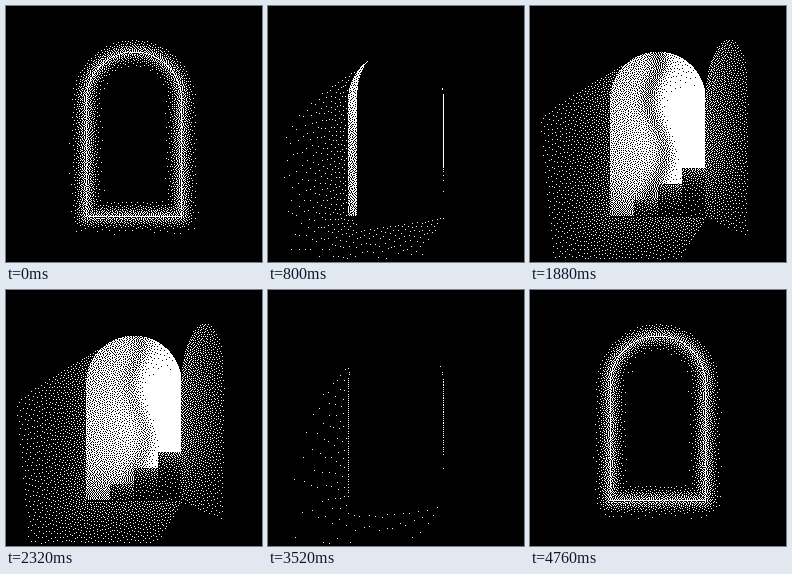
Write an HTML page with a canvas that moves like this. It is 256 by 256 pixels and loops after 4800 ms.

```html
<!DOCTYPE html>
<html lang="en">
<head>
<meta charset="utf-8">
<title>Door of light</title>
<style>
html, body { margin: 0; width: 100%; height: 100%; overflow: hidden; background: #000; }
canvas { display: block; width: 100%; height: 100%; image-rendering: pixelated; }
</style>
</head>
<body>
<canvas id="stage" width="256" height="256"></canvas>
<script>
const SIZE = 256, LOOP = 4800, STEP = 40;
const DEPTH = 411, EYE_X = 128, EYE_Y = 138, HINGE = 174.8, WIDE = 95;
const ctx = document.getElementById('stage').getContext('2d');
const image = ctx.createImageData(SIZE, SIZE);
const dots = new Uint32Array(image.data.buffer);
const light = new Float32Array(SIZE * SIZE);

// Fixed grain that keeps the stipple from forming rows
let seed = 7;
const grain = Float32Array.from({ length: SIZE * SIZE }, () => {
  seed = (Math.imul(seed, 1664525) + 1013904223) >>> 0;
  return 0.5 + 0.24 * (seed / 4294967296 - 0.5);
});

const clamp = v => Math.max(0, Math.min(1, v));
const smooth = v => { v = clamp(v); return v * v * (3 - 2 * v); };

// Linear track through [time, value] points
function track(points, t) {
  if (t <= points[0][0]) return points[0][1];
  for (let i = 1; i < points.length; i++) {
    const [a, va] = points[i - 1], [b, vb] = points[i];
    if (t < b) return va + (vb - va) * (t - a) / (b - a);
  }
  return points[points.length - 1][1];
}

// Signed distance to the arched doorway
function arch(x, y) {
  const dx = Math.abs(x - 127.5);
  if (y < 93) return Math.hypot(dx, y - 93) - 47.5;
  const sx = dx - 47.5, sy = y - 210;
  return sx > 0 && sy > 0 ? Math.hypot(sx, sy) : Math.max(sx, sy);
}

function doorAngle(t) {
  const opening = 1 - (1 - clamp((t - 650) / 920)) ** 2;
  const closing = clamp((t - 2850) / 730) ** 2;
  return 104 * (opening - closing);
}

function room(x, y, veil) {
  const stair = 210 - 16 * Math.floor((x - 80) / 24);
  if (y >= stair) {
    if (y === 210) return 0;
    return 0.04 + (0.2 + 0.0024 * (x - 80)) * Math.exp((stair - y) / 12);
  }
  const bend = veil.x - 8 * Math.sin((y - 67) / 17) * smooth((y - 40) / 30);
  const off = x - bend;
  const far = Math.hypot(x - 170, y - 125);
  const base = 1.01 - far * 0.0033 - 0.16 * smooth((y - 165) / 50);
  const bright = 0.13 * smooth((off + 2) / 20);
  return clamp(base + bright - veil.depth * Math.exp(-off * off / 90));
}

function spill(x, y, d, gain) {
  const inBeam = y > 65 + (80 - x) * 0.58 && x > 8 + (y - 107) * 0.1 && y < 253;
  const inSide = x < 95 || y > 210;
  if (!inBeam || !inSide || (y > 210 && x > 176 - (y - 211) * 0.6)) return 0;
  return 0.2 * gain * Math.exp(-d / (20 + 22 * gain));
}

// Position on the swinging leaf seen in perspective, or -1 when missed
function leafHit(x, y, cos, sin) {
  const px = x - EYE_X;
  const w = DEPTH * (HINGE - EYE_X - px) / (DEPTH * cos - px * sin);
  if (!(w >= 0 && w <= WIDE)) return -1;
  const scale = DEPTH / (DEPTH - w * sin);
  return arch(175 - w, EYE_Y + (y - EYE_Y) / scale) <= -0.1 ? w / WIDE : -1;
}

function shade(t) {
  const angle = doorAngle(t), rad = angle * Math.PI / 180;
  const cos = Math.cos(rad), sin = Math.sin(rad);
  const edge = (HINGE - EYE_X - WIDE * cos) * DEPTH / (DEPTH - WIDE * sin) + EYE_X;
  const innerSide = edge > HINGE;
  const lit = smooth(angle / 30), gain = clamp((angle - 8) / 60);
  const breath = 0.95 + 0.05 * Math.cos(t / LOOP * 4 * Math.PI);
  const glow = breath * (1 - smooth((t - 250) / 470) + smooth((t - 3600) / 800));
  const veil = {
    x: track([[800, 80], [1400, 121], [2320, 132], [2880, 152], [3560, 165]], t),
    depth: track([[800, 0.1], [1400, 0.42], [2320, 0.2], [2880, 0.15]], t)
  };
  for (let y = 0, i = 0; y < SIZE; y++) {
    for (let x = 0; x < SIZE; x++, i++) {
      const d = arch(x, y);
      let v = 0;
      if (angle > 0) {
        const w = leafHit(x, y, cos, sin);
        if (w >= 0) {
          if (innerSide) v = (0.34 - 0.23 * w) * (1 - 0.55 * smooth((y - 140) / 80));
        } else {
          v = d <= 0.3 ? lit * room(x, y, veil) : spill(x, y, d, gain);
        }
      }
      if (glow > 0.01 && Math.abs(d) < 19) {
        v += glow * (0.46 * Math.exp(-d * d / 78) + (Math.abs(d) < 0.5 ? 0.36 : 0));
      }
      light[i] = v;
    }
  }
}

// Turn brightness into black and white grain, sweeping rows in alternate directions
function stipple() {
  for (let y = 0; y < SIZE; y++) {
    const dir = y % 2 ? -1 : 1;
    for (let n = 0; n < SIZE; n++) {
      const x = dir > 0 ? n : SIZE - 1 - n, i = y * SIZE + x;
      const on = light[i] >= grain[i], rest = (light[i] - on) / 16;
      const below = i + SIZE, more = n < SIZE - 1;
      dots[i] = on ? 0xffffffff : 0xff000000;
      if (more) light[i + dir] += rest * 7;
      if (y === SIZE - 1) continue;
      if (n > 0) light[below - dir] += rest * 3;
      light[below] += rest * 5;
      if (more) light[below + dir] += rest;
    }
  }
}

let shown = -1;
function draw(now) {
  const t = Math.floor(now % LOOP / STEP) * STEP;
  if (t !== shown) {
    shown = t;
    shade(t);
    stipple();
    ctx.putImageData(image, 0, 0);
  }
}

const start = performance.now();
function loop() {
  draw(performance.now() - start);
  requestAnimationFrame(loop);
}
loop();
</script>
</body>
</html>
```
